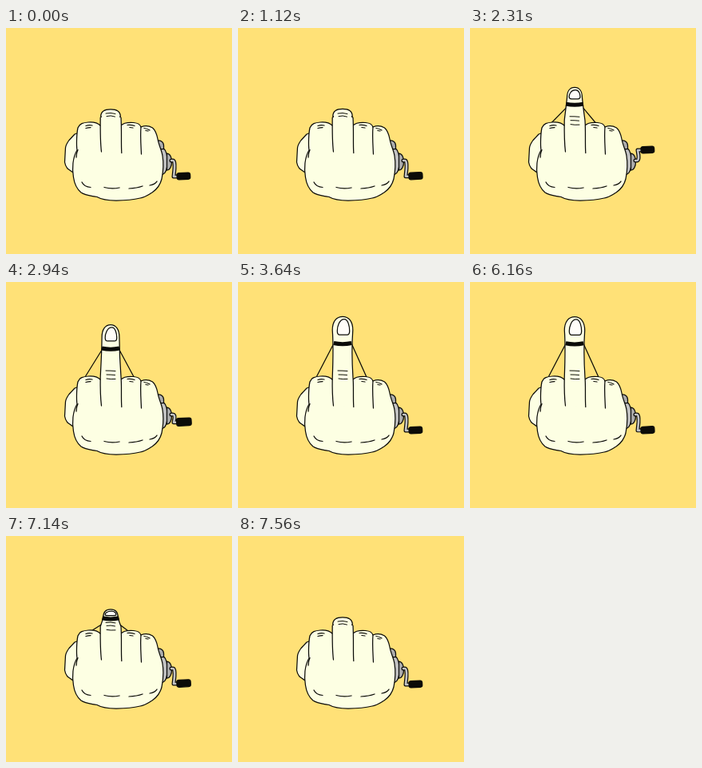
Write an HTML page that moves like this. It is 283 px wide and 283 px high and loops after 7.98 s.

```html
<!DOCTYPE html>
<html lang="en">
<head>
<meta charset="utf-8">
<title>Crank</title>
<style>
  html, body { margin: 0; width: 100%; height: 100%; overflow: hidden; background: #ffe177; }
  svg { display: block; width: 100vw; height: 100vh; }
  path, rect { stroke: #0b0b08; stroke-width: 1.25; stroke-linecap: round; stroke-linejoin: round; }
  .skin { fill: #fdffe3; }
  .line { fill: none; }
  .metal { fill: #c3c3c3; }
  .dark { fill: #acacac; }
  #armEdge { stroke-width: 5; }
  #arm { stroke: #c3c3c3; stroke-width: 2.6; }
  #handle { fill: #0b0b08; }
  #nail { fill: #fffdf8; }
  #band { stroke-linecap: butt; }
  #folds { stroke-width: 1; }
</style>
</head>
<body>
<svg viewBox="0 0 283 283">
  <path class="skin" d="M90 131.500L86 133L79 140.500Q75 146 74.500 150L73.500 168Q74 172 77 176L84 181H90Z"/>

  <path class="metal dark" d="M188 141.500C193 140 197 142 197.500 147V153H188Z"/>
  <path class="metal" d="M190 151.500H198C201 154 202 160 202 168C202 176 200 182 196 183.500H188Z"/>
  <path class="metal dark" d="M201.500 157C205.500 157 207.500 162 207.500 167.500C207.500 173 205.500 178 201.500 178Z"/>
  <path id="armEdge" class="line"/>
  <path id="arm" class="line"/>
  <rect id="handle"/>

  <path id="strings" class="line"/>
  <path class="skin" d="M89 153C88 146 88.500 132 90 125C92 119.500 97 118.500 103 118C109 117.500 114 118 118 122H144
    C148 118 154 118 160 118.500C165 119 168 121 169 124C174 122 180 123 183.500 125C187 128 189 134 190 139
    C191 146 195 153 196 160C197.500 169 197 179 195 189C193 197 189 202 183 206C178 209 174 212 168 213
    C160 215 149 216 138 216C129 216 120 215 114 211.500C107 210 100 210 94 206C88 201 85.500 194 84.500 187
    C82.500 176 83.500 162 89 153Z"/>
  <path class="line" d="M90 152.500Q88 157 88 162M169 124C168 135 169 147 169.500 158
    M100 122.500Q104 121 108 122M100 125.500Q103 124.500 106 124.500
    M152 121.500Q157 121 161 122.500M155 124.500L159 125M173 125.500Q177 126 180 128M175 128.500L178 129
    M95 193Q98 199 106 199.500M123 199.500Q132 202 142 200M154 201Q164 200.500 171 198M180 197Q186 196 189 192"/>

  <path id="finger" class="skin"/>
  <path id="nail"/>
  <path id="band" class="line"/>
  <path id="folds" class="line"/>
</svg>
<script>
  const LOOP = 7980, STEP = 70, TURNS = 5;
  const RISE = { start: 1050, steps: 38 }, FALL = { start: 6160, steps: 21 };
  const el = id => document.getElementById(id);
  const draw = (id, d) => el(id).setAttribute('d', d);
  const set = (id, attrs) => { for (const key in attrs) el(id).setAttribute(key, attrs[key]); };

  // Sine-eased progress of a move, held for STEP ms at a time.
  function progress(time, { start, steps }) {
    const count = Math.floor((time - start) / STEP) + 1;
    const part = Math.min(1, Math.max(0, count / steps));
    return (1 - Math.cos(Math.PI * part)) / 2;
  }

  function drawCrank(angle) {
    const near = Math.sin(angle);
    const y = 169.5 + 16.5 * Math.cos(angle) + 0.5 * near;
    const w = 16.6 + 2 * near, h = 8.3 + 1.4 * near;
    const arm = `M207 166H209Q211.500 166 211 ${(166 + y) / 2}L210 ${y}H215`;
    draw('armEdge', arm);
    draw('arm', arm);
    set('handle', {
      x: 222.4 + near * 0.5 - w / 2, y: y - 0.5 - h / 2, width: w, height: h, rx: 2.6,
      transform: `rotate(-3 222 ${y})`
    });
  }

  function drawNail(x, half, top, end) {
    const low = end - (end - top) * 0.25;
    const middle = (top + end) / 2;
    draw('nail', `M${x - half} ${low}
      C${x - half} ${middle} ${x - half * 0.7} ${top} ${x + 1} ${top}
      C${x + half * 0.8} ${top} ${x + half} ${middle} ${x + half} ${low}
      Q${x + half} ${end} ${x + half - 3} ${end}H${x - half + 3}Q${x - half} ${end} ${x - half} ${low}Z`);
  }

  function drawFinger(lift) {
    const mid = 131;
    const top = 101.8 - 58.5 * lift;
    const offset = 34 * lift ** 0.6;
    const bandY = top + offset;
    const bandHalf = 10.4 + 0.8 * lift;
    const tip = 9.3 + 3.5 * lift ** 4 + 3 * Math.max(0, 1 - lift / 0.16);
    const side = top + 9 + 8 * lift;
    const round = top + 3 + 3 * lift;
    const shoulder = 112 + 8 * lift;
    const waist = Math.max(side, Math.min(bandY + 4, shoulder));

    draw('finger', `M119.500 155C118 143 118 130 118.200 ${shoulder}
      C118.500 ${shoulder - 8 * lift} ${mid - bandHalf} ${waist} ${mid - tip} ${side}
      C${mid - tip} ${round} ${mid - tip * 0.6} ${top} ${mid} ${top}
      C${mid + tip * 0.6} ${top} ${mid + tip} ${round} ${mid + tip} ${side}
      C${mid + bandHalf} ${waist} 143.500 ${shoulder - 8 * lift} 144 ${shoulder}
      C145 130 144 143 144.800 156.500`);

    const raised = lift > 0.03;
    for (const id of ['band', 'strings', 'nail']) el(id).style.display = raised ? '' : 'none';
    el('band').style.strokeWidth = Math.min(offset / 2, 5);
    draw('band', `M${mid - bandHalf} ${bandY - 0.8}Q${mid} ${bandY + 1.6} ${mid + bandHalf} ${bandY - 0.8}`);

    const tie = bandY + 8 * (1 - lift);
    draw('strings', `M94 127L${mid - bandHalf} ${tie}M165 128L${mid + bandHalf} ${tie}`);
    drawNail(mid + lift ** 4, 6.9 + 0.8 * lift ** 4, top + Math.min(3.3, offset * 0.2), top + offset * 0.67);

    const settle = Math.min(1, lift * 2);
    const fold = (left, y, right, bend) => `M${left} ${y}Q131 ${y + bend} ${right} ${y + 0.5}`;
    const bend = -1.5 + 1.5 * settle;
    draw('folds', fold(125, 107 + 4 * settle, 137, bend) + fold(126, 110.5 + 5.5 * settle, 136.500, bend)
      + (lift > 0.1 ? fold(126, 115.5 + 5.5 * settle, 137, 1) : ''));
  }

  function render(now) {
    const time = now % LOOP;
    const up = progress(time, RISE), down = progress(time, FALL);
    const level = up - down;
    drawCrank((up + down) * TURNS * 2 * Math.PI);
    drawFinger(Math.max(0, level - 0.03 * Math.sin(Math.PI * level)));
  }

  const begin = performance.now();
  function tick() {
    render(performance.now() - begin);
    requestAnimationFrame(tick);
  }
  tick();
</script>
</body>
</html>
```
